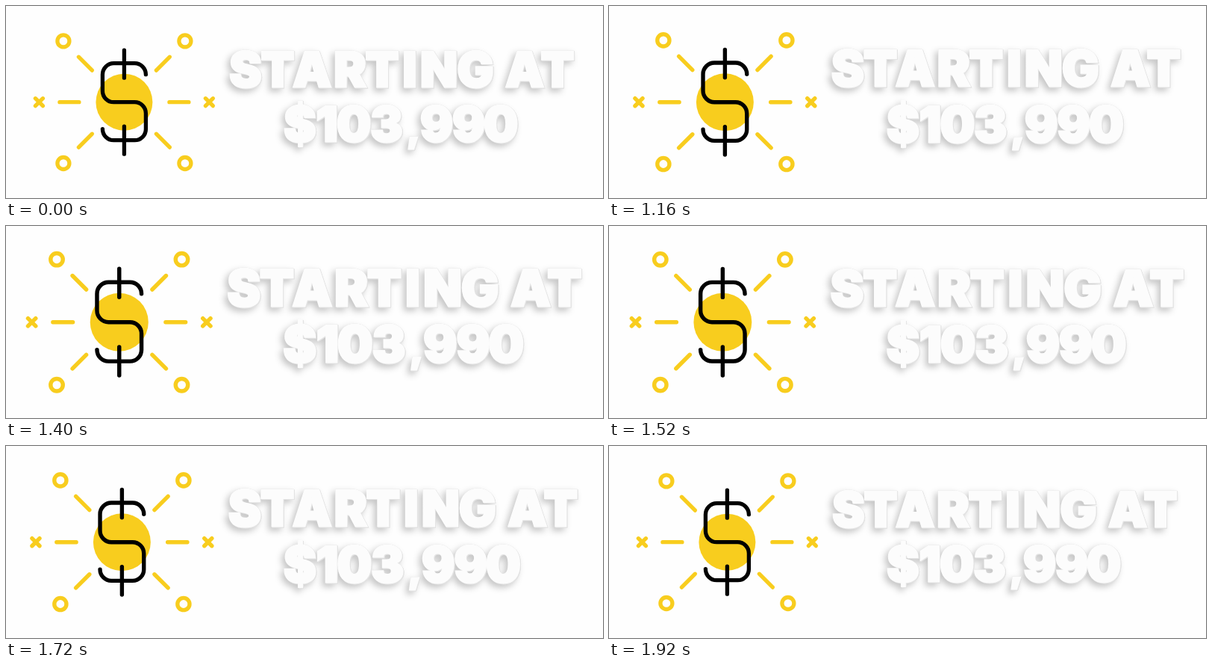
An HTML page that plays this animation: 800x257 px, repeating every 1960 ms.

```html
<!DOCTYPE html>
<html lang="en">
<head>
<meta charset="utf-8">
<title>Starting price</title>
<style>
  html, body { margin: 0; width: 100%; height: 100%; overflow: hidden; background: #fefefe; }
  svg { display: block; width: 800px; height: 257px; }
  #stage { transform-origin: 400px 128.7px; }
  .sun, .dollar { fill: none; stroke-width: 5.3; stroke-linecap: round; stroke-linejoin: round; }
  .sun { stroke: #f8cd1e; }
  .dollar { stroke: #000; }
  .price {
    font: 900 65px Inter, Roboto, sans-serif;
    text-anchor: middle;
    fill: #fcfcfc;
    stroke: #fcfcfc;
    stroke-width: 3;
    stroke-linejoin: miter;
    stroke-miterlimit: 3;
    filter: drop-shadow(1px 1px 0 #e4e4e4) drop-shadow(.7px .7px 0 #d6d6d6)
            drop-shadow(-4px 4px 4px rgba(0, 0, 0, .22));
  }
  .comma { font-size: 46px; }
</style>
</head>
<body>
<svg viewBox="0 0 800 257">
  <defs>
    <!-- One quarter of the rays, mirrored around the coin -->
    <g id="ray">
      <circle cx="-81.5" cy="-81.8" r="8"/>
      <path d="M-61 -60.5L-43 -42.5"/>
    </g>
    <g id="side">
      <path d="M-86.5 0H-60.5M-119 -5L-109 5M-119 5L-109 -5"/>
    </g>
  </defs>
  <g id="stage">
    <g transform="translate(158.4 128.7)">
      <circle r="38" fill="#f8cd1e"/>
      <g class="sun">
        <use href="#ray"/>
        <use href="#ray" transform="scale(-1 1)"/>
        <use href="#ray" transform="scale(1 -1)"/>
        <use href="#ray" transform="scale(-1 -1)"/>
        <use href="#side"/>
        <use href="#side" transform="scale(-1 1)"/>
      </g>
      <path class="dollar" d="M0 -69.5V-32.5M0 32.5V69.5
        M29 -37A15 15 0 0 0 14 -52H-14A15 15 0 0 0 -29 -37V-15A15 15 0 0 0 -14 0
        H14A15 15 0 0 1 29 15V36A15 15 0 0 1 14 51H-14A15 15 0 0 1 -29 36"/>
    </g>
    <g class="price">
      <text y="107.5" x="321 364 410 461 504 541 580 629 661 695 739">STARTING AT</text>
      <text y="181" x="394 430 466 510 546 577 620 663">$103<tspan class="comma">,</tspan>990</text>
    </g>
  </g>
</svg>
<script>
  const LOOP = 1960, START = 1000, PEAK = 1480;
  const easing = 'steps(12, start)';
  const rest = 'scale(1)', grown = 'scale(1.03)';

  // Hold, then grow and shrink in even 40 ms steps
  document.getElementById('stage').animate([
    { transform: rest, offset: 0 },
    { transform: rest, offset: START / LOOP, easing },
    { transform: grown, offset: PEAK / LOOP, easing },
    { transform: rest, offset: 1 }
  ], { duration: LOOP, iterations: Infinity });
</script>
</body>
</html>
```
